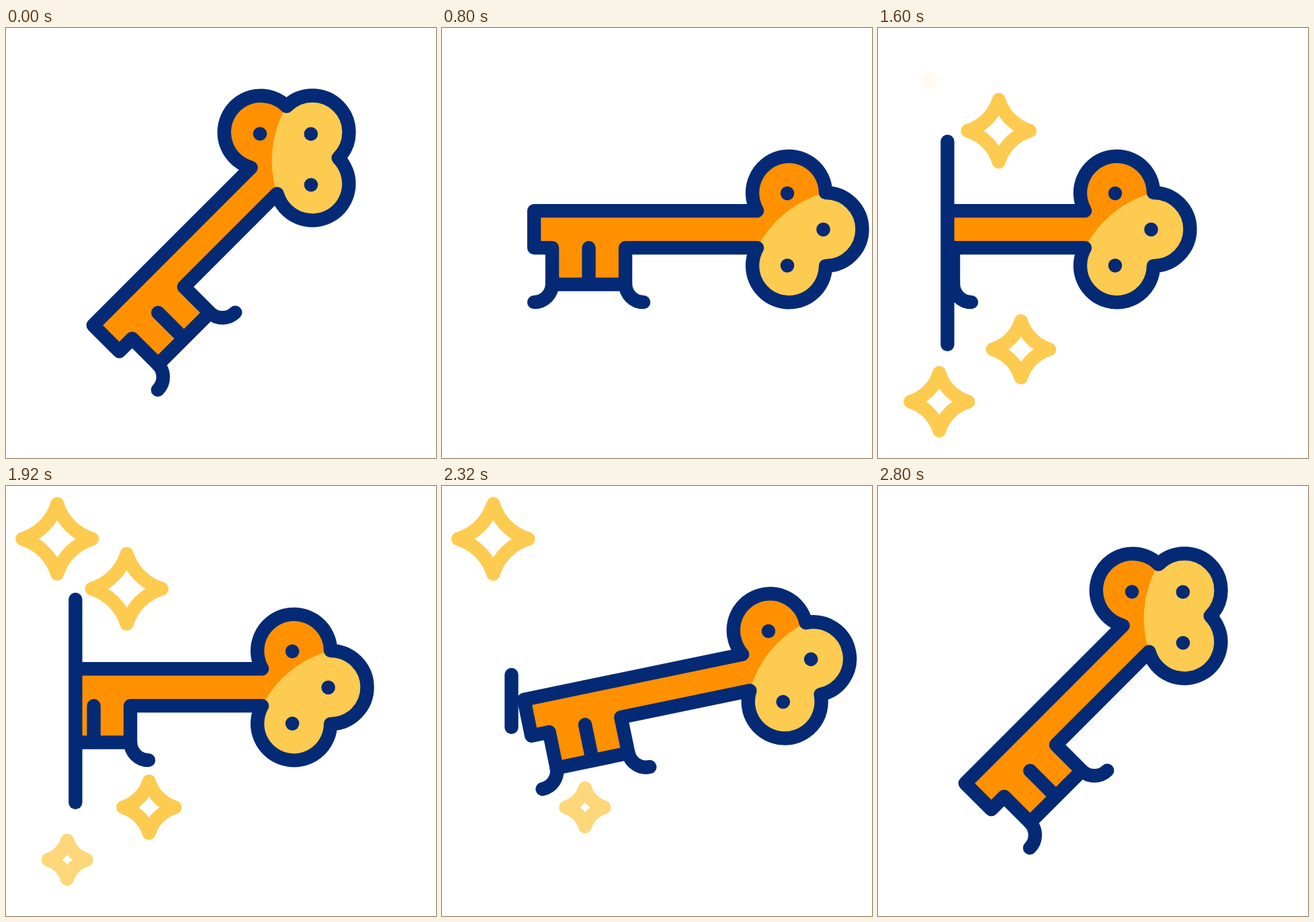
An HTML page that plays this animation: 640 px wide and 640 px high, repeating every 3 s.

```html
<!DOCTYPE html>
<html lang="en">
<head>
<meta charset="utf-8">
<title>Key and lock</title>
<style>
  html, body { margin: 0; width: 100%; height: 100%; overflow: hidden; background: #fff; }
  svg { display: block; width: 100%; height: 100%; }
  .line { fill: none; stroke: #042a76; stroke-width: 20.4; stroke-linecap: round; stroke-linejoin: round; }
  .star { fill: none; stroke: #fdcb50; stroke-width: 20.4; stroke-linejoin: round; }
</style>
</head>
<body>
<svg viewBox="0 0 640 640">
  <defs>
    <clipPath id="wall"><rect x="103" width="537" height="640"/></clipPath>
    <path id="body" d="M469 272H137V327H164V381.500H273V327H469A54.500 54.500 0 1 0 571 354A54.500 54.500 0 0 0 571 245A54.500 54.500 0 1 0 469 272Z"/>
  </defs>
  <g clip-path="url(#wall)">
    <g id="key">
      <use href="#body" fill="#ff9100"/>
      <path fill="#fdcb50" d="M469 327A160 160 0 0 1 571 245A54.500 54.500 0 0 1 571 354A54.500 54.500 0 1 1 469 327Z"/>
      <use href="#body" class="line"/>
      <path class="line" d="M218.500 327V381M164 381a27 27 0 0 1 -27 27M273 381a27 27 0 0 0 27 27"/>
      <g fill="#042a76">
        <circle cx="514" cy="246" r="10.300"/>
        <circle cx="567.500" cy="299.800" r="10.300"/>
        <circle cx="514" cy="353.500" r="10.300"/>
      </g>
    </g>
  </g>
  <path id="bar" class="line"/>
  <g id="stars"></g>
</svg>
<script>
const LOOP = 3000;
const key = document.getElementById('key');
const bar = document.getElementById('bar');
const clamp = v => Math.min(1, Math.max(0, v));
const smooth = p => p * p * (3 - 2 * p);

// cubic-bezier(.33, 0, .08, 1)
function ease(p) {
  let lo = 0, hi = 1;
  for (let i = 0; i < 24; i++) {
    const s = (lo + hi) / 2, r = 1 - s;
    if (0.99 * r * r * s + 0.24 * r * s * s + s ** 3 < p) lo = s; else hi = s;
  }
  return smooth(lo);
}

const ramp = (t, start, end) => t <= start ? 0 : t >= end ? 1 : ease((t - start) / (end - start));
const pulse = (t, inStart, inEnd, outStart, outEnd) =>
  ramp(t, inStart, inEnd) - ramp(t, outStart, outEnd);

// Twinkle: [time, scale], every star repeats it 200 ms later than the one before
const twinkle = [[950, 0], [1300, 1], [1520, 0.735], [1733, 1], [2133, 0]];
const TIP = 52.2;

function starScale(t) {
  let scale = 0;
  for (let i = 1; i < twinkle.length; i++) {
    const [t0, a] = twinkle[i - 1], [t1, b] = twinkle[i];
    if (t >= t0 && t < t1) scale = a + (b - a) * smooth(clamp((t - t0) / (t1 - t0)));
  }
  return scale;
}

const stars = [[91.2, 556.2], [179.7, 153], [212.8, 478.2], [76.2, 78.7]].map(([x, y], i) => {
  const el = document.createElementNS('http://www.w3.org/2000/svg', 'path');
  el.setAttribute('class', 'star');
  el.setAttribute('transform', `translate(${x} ${y})`);
  document.getElementById('stars').append(el);
  return { el, delay: i * 200 };
});

function starPath(tip) {
  const arc = `A${1.5 * tip} ${1.5 * tip} 0 0 0 `;
  return `M0 ${-tip}${arc}${tip} 0${arc}0 ${tip}${arc}${-tip} 0${arc}0 ${-tip}Z`;
}

function draw(t) {
  const level = pulse(t, 200, 800, 2200, 2800);
  const inserted = pulse(t, 933, 1400, 1868, 2070);
  const x = 320 + 38.1 * level - 161 * inserted;
  key.setAttribute('transform',
    `translate(${x} 320) rotate(${-45 * (1 - level)}) translate(-358.1 -319.9)`);

  const half = 151 * pulse(t, 800, 1267, 2131, 2600);
  bar.setAttribute('d', half > 0.1 ? `M103.400 ${320 - half}V${320 + half}` : '');

  for (const { el, delay } of stars) {
    const scale = starScale(t - delay);
    el.setAttribute('d', scale > 0 ? starPath(TIP * scale) : '');
    el.setAttribute('opacity', Math.min(1, 1.4 * scale));
  }
}

function tick() {
  draw(performance.now() % LOOP);
  requestAnimationFrame(tick);
}
tick();
</script>
</body>
</html>
```
